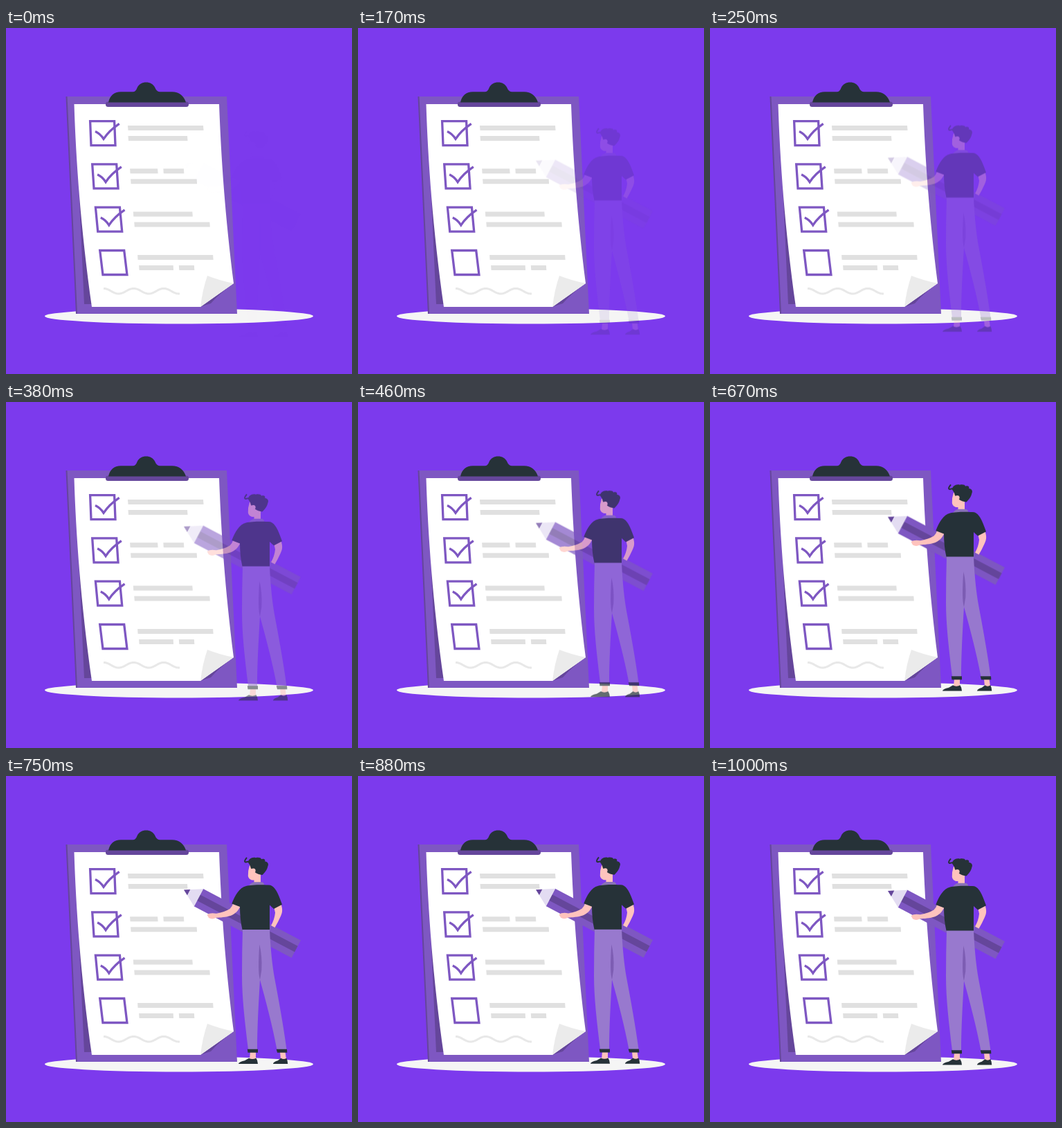
Write an HTML page that moves like this. It is 500 px wide and 500 px high and loops after 1040 ms.

```html
<!DOCTYPE html>
<html lang="en">
<head>
<meta charset="utf-8">
<title>Checklist</title>
<style>
  html, body { margin: 0; width: 100%; height: 100%; overflow: hidden; background: #7c3aed; }
  svg { display: block; width: 100%; height: 100%; }
  .main { fill: #7e57c2; }
  .deep { fill: #65469b; }
  .ink { fill: #263238; }
  .skin { fill: #ffc3bd; }
  .cloth { fill: #9879ce; }
  .fold { fill: #7d5db3; }
  .bar { fill: #e0e0e0; }
  .line { fill: none; stroke: #7e57c2; stroke-width: 3.3; }
  .wave { fill: none; stroke: #e8e8e8; stroke-width: 3; }
</style>
</head>
<body>
<svg viewBox="0 0 500 500">
  <ellipse cx="250" cy="416.5" rx="194" ry="11" fill="#f5f5f5"/>

  <!-- clipboard -->
  <path class="deep" d="M86.5 99H92L108 413H101Z"/>
  <path class="main" d="M88.5 99H319L334 413H103Z"/>
  <path class="deep" d="M105 225L113 399H126Z"/>
  <path class="deep" d="M281 403L329 369Q309 383 296 398Q289 400 281 403Z"/>
  <path fill="#fff" d="M98.5 110H308C311 190 316.5 270 329 369L281 403H124C108 290 101 190 98.5 110Z"/>
  <path fill="#ebebeb" d="M291 358Q309 365 329 369L281 403Q284 378 291 358Z"/>
  <rect class="deep" x="144" y="106.5" width="120" height="7.5" rx="3.5"/>
  <path class="ink" d="M148 107.5C150 98 156 92.3 166 92.3H182C187 92.3 188 90 189.5 86.5C192 81 197 78.5 202.5 78.5S213 81 215.5 86.5C217 90 219 92.3 224 92.3H240C250 92.3 257 98 260 107.5Z"/>
  <g id="sheet"></g>

  <g id="man" opacity="0">
    <!-- pencil, lying along its own axis -->
    <g transform="translate(257 166) rotate(27.8)">
      <rect class="main" x="24" y="-14.3" width="159.5" height="28.6"/>
      <rect class="deep" x="24" y="-4.8" width="159.5" height="9.6"/>
      <path fill="#e3dcf2" d="M0 0L24.3 -14.3V14.3Z"/>
      <path class="deep" d="M0 0L8 -4.7V4.7Z"/>
    </g>

    <!-- feet -->
    <path class="skin" d="M353 400H361V411H352Z"/>
    <path class="skin" d="M396 400H403.5L405 411H397Z"/>
    <path id="shoe" class="ink" d="M336 417.5Q336 415 345 412.8L351 409.3Q356 412 361.5 409.2Q363.5 412 364 417.5Z"/>
    <use href="#shoe" transform="translate(130.6 0) scale(.76 1)"/>

    <!-- trousers -->
    <path class="cloth" d="M342 222H381C382 250 385 276 388 293C394 325 401 362 405.5 397H391.5C385 362 375 325 367 296C365 330 363 365 363 397H350C345 355 341 322 341 290Q341 255 342 222Z"/>
    <path class="fold" d="M366.3 245C369 256 370 268 369.3 282L367 296C364.5 288 364.500 270 366.300 245Z"/>
    <path class="ink" d="M348.800 396.300H364V401.300H349.500Z"/>
    <path class="ink" d="M390.700 396.300H406L406.300 401.300H392Z"/>

    <!-- arms -->
    <path class="skin" d="M387 190L397.500 187C400 194 399.500 199 397 204Q393 213 388.500 220.500L383 217.500Q388 209 389 199Z"/>
    <path class="skin" d="M328.500 185L339 189C336 196 331 201 325 203.300C318 205.500 309 206.300 303.500 206.300Q298 209.500 293 206.500L290.500 202Q295 198.500 304 200.300Q316 198 323.500 193.500Q327 190 328.500 185Z"/>

    <!-- head -->
    <path class="skin" d="M352 131Q349.300 139 349.800 146C350.500 150 354 152.500 358.500 152V157.500H368V143L366 130Z"/>
    <path fill="none" stroke="#263238" stroke-width="2" d="M348 119.300Q343 125.500 346.500 126Q348 125.500 352 125"/>
    <path class="ink" d="M354 135Q353.500 131 350 126.500C350 121.500 356 118 361 119.800C364 118.800 369 119.500 369 121.800C372 120.300 375.500 122.300 374 124.800C378.500 125.500 380 129 378.300 132C377 138 373 142 370.500 144.500Q364 144 359.500 140.500Z"/>
    <circle class="skin" cx="357.300" cy="138.300" r="3.300"/>
    <path fill="#8a72b8" d="M358 154.700H370Q373 155.500 373.500 160H351Q353 156.500 358 154.700Z"/>

    <!-- shirt -->
    <path class="ink" d="M347 160.500C355 158.500 372 158.300 382 159.300C389 162 393 170 399 187.300L387 193.500L381 188V223.500H341.500Q338 208 338 190.500L326.300 186C331 174 337 163 347 160.500Z"/>
  </g>
</svg>
<script>
  const ROW = 62.3, BOX = 35, GAP = 8.2;
  const path = (cls, d) => `<path class="${cls}" d="${d}"/>`;

  // Rows drift right as the paper curls
  const drift = i => 2.3 * i + 0.8 * i * i;

  function box(i) {
    const x = 121.6 + drift(i), y = 134.6 + ROW * i, lean = 1.4 + 0.95 * i;
    const frame = path('line', `M${x} ${y}h${BOX}l${lean} ${BOX}h${-BOX}z`);
    const tick = path('line', `M${x + 7.4} ${y + 14.9}q7 3 12 10.8q8 -12.300 22.700 -22`);
    return i < 3 ? frame + tick : frame;
  }

  // One text line: grey words of the given widths
  function words(widths, n) {
    const i = n >> 1, low = n % 2;
    let x = 176 + drift(i) + low * (0.5 + 0.5 * i);
    const y = 141 + ROW * i + low * 15;
    return widths.map(w => {
      const word = path('bar', `M${x} ${y}h${w}l.5 7h${-w}z`);
      x += w + GAP;
      return word;
    }).join('');
  }

  function wave() {
    const points = [];
    for (let x = 141; x <= 251; x++) {
      points.push(`${x} ${380.2 - 3.8 * Math.cos((x - 141) / 43.5 * 2 * Math.PI)}`);
    }
    return path('wave', 'M' + points.join('L'));
  }

  const long = 109, mid = 85.5;
  const text = [[long], [mid], [40, 29.5], [95.5], [mid], [long], [long], [49.5, 22]];
  document.getElementById('sheet').innerHTML =
    [0, 1, 2, 3].map(box).join('') + text.map(words).join('') + wave();

  const LOOP = 1040, STEPS = 25, RISE = 30;
  const man = document.getElementById('man');

  const bezier = (s, a, b) => 3 * (1 - s) ** 2 * s * a + 3 * (1 - s) * s * s * b + s ** 3;

  // cubic-bezier(.36, -.01, .5, 1.38)
  function ease(x) {
    let lo = 0, hi = 1;
    for (let i = 0; i < 30; i++) {
      const mid = (lo + hi) / 2;
      if (bezier(mid, 0.36, 0.5) < x) lo = mid; else hi = mid;
    }
    return bezier(hi, -0.01, 1.38);
  }

  function draw(ms) {
    // Poses change 24 times a second, on a 10 ms clock
    const clock = Math.floor((ms % LOOP) / 10) * 10;
    const step = Math.floor((clock + 4.9) * 24 / 1000);
    const k = ease((step + 1) / STEPS);
    man.setAttribute('opacity', Math.max(0, Math.min(1, k)));
    man.setAttribute('transform', `translate(0 ${RISE * (1 - k)})`);
  }

  const start = performance.now();
  function loop() {
    draw(performance.now() - start);
    requestAnimationFrame(loop);
  }
  loop();
</script>
</body>
</html>
```
